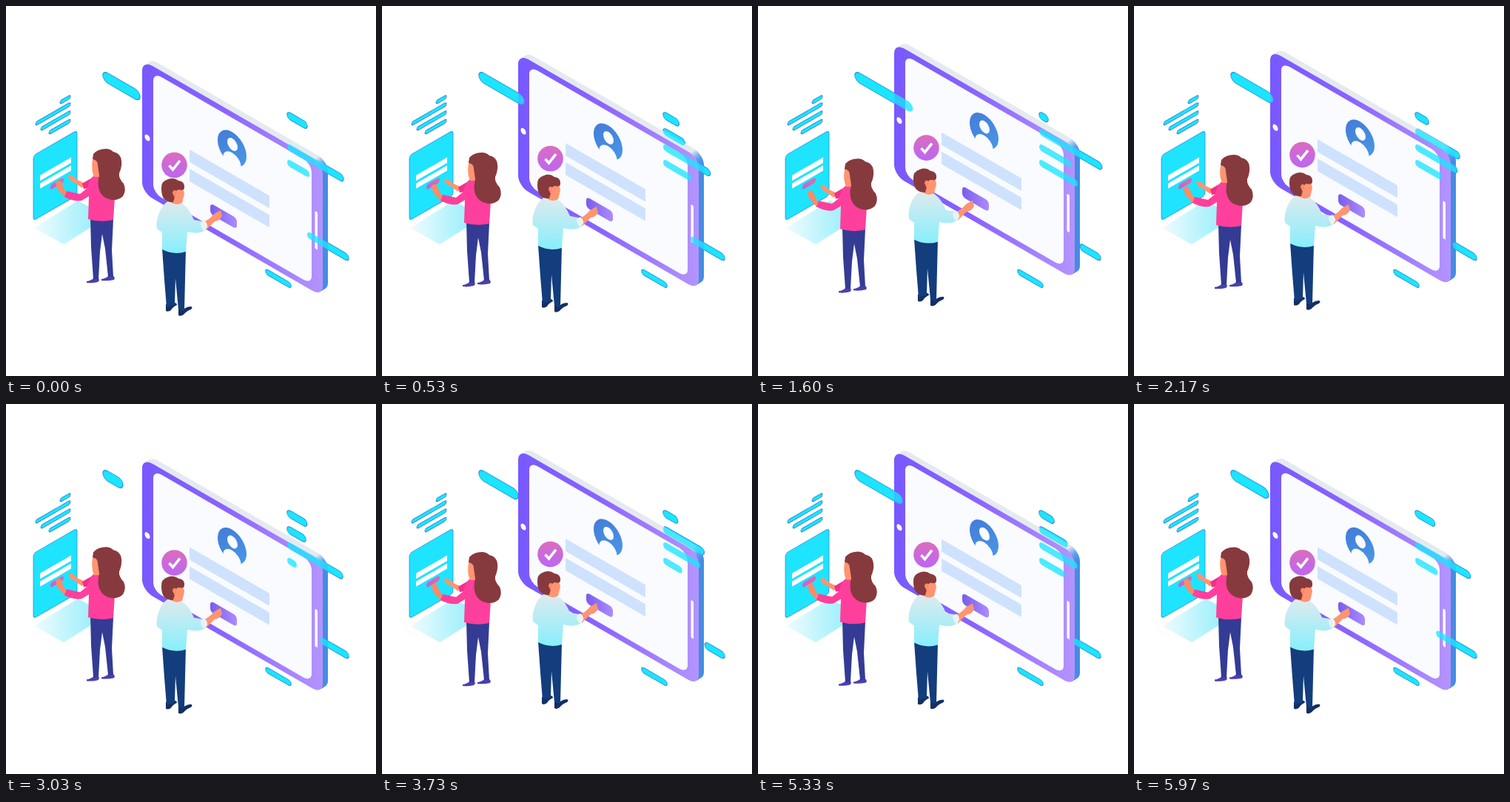
These frames come from a looping animation (500 px wide and 500 px high, 6.01 s). An HTML page:

```html
<!DOCTYPE html>
<html lang="en">
<head>
<meta charset="utf-8">
<title>Isometric sign-in</title>
<style>
  html, body { margin: 0; width: 100%; height: 100%; overflow: hidden; background: #fff; }
  svg { display: block; width: 100vw; height: 100vh; }
</style>
</head>
<body>
<svg viewBox="0 0 500 500">
  <defs>
    <linearGradient id="frame"><stop offset="0" stop-color="#7859ff"/><stop offset=".45" stop-color="#8a63ff"/><stop offset="1" stop-color="#b494ff"/></linearGradient>
    <linearGradient id="side"><stop offset=".95" stop-color="#e5eaf0"/><stop offset=".985" stop-color="#5b9bee"/><stop offset="1" stop-color="#4389e0"/></linearGradient>
    <linearGradient id="avatar" x2="1" y2="1"><stop offset="0" stop-color="#4279d6"/><stop offset="1" stop-color="#4a9ae8"/></linearGradient>
    <linearGradient id="badge" x2="0" y2="1"><stop offset="0" stop-color="#dc6cbe"/><stop offset="1" stop-color="#bb66f5"/></linearGradient>
    <linearGradient id="button"><stop offset="0" stop-color="#7b5cec"/><stop offset="1" stop-color="#ab8cff"/></linearGradient>
    <linearGradient id="pink"><stop offset="0" stop-color="#c065d8"/><stop offset="1" stop-color="#e06aaa"/></linearGradient>
    <linearGradient id="base"><stop offset="0" stop-color="#f0fcff"/><stop offset=".75" stop-color="#a2f0fb"/></linearGradient>
    <linearGradient id="shirt" x2="0" y2="1"><stop offset="0" stop-color="#e0eaee"/><stop offset="1" stop-color="#86effc"/></linearGradient>
    <rect id="slab" width="244" height="179" rx="14"/>
  </defs>

  <!-- laptop -->
  <path d="M38 300 97 263 137 285 78 322Z" fill="url(#base)"/>
  <g transform="translate(37 202) skewY(-30)">
    <rect width="59" height="88" rx="4" fill="#1ee4ff" stroke="#2a8ee0" stroke-width=".8"/>
    <path d="M9 32h42v7.500h-42zM9 43h42v7h-42z" fill="#fff"/>
    <rect x="23" y="53" width="18" height="7" rx="3" fill="url(#pink)"/>
  </g>
  <g id="stripes" fill="#1ce4ff" stroke="#2a7fd8" stroke-width=".9"></g>

  <g id="under" fill="#1ce5ff" stroke="#2a7fd8" stroke-width="1.400"></g>

  <g id="phone">
    <g transform="translate(184 73) skewY(30)">
      <g id="depth" fill="url(#side)"></g>
      <use href="#slab" fill="url(#frame)"/>
      <rect x="15" y="8" width="214" height="163" rx="11" fill="#f9fbff"/>
      <ellipse cx="7" cy="101" rx="3.500" ry="4" fill="#fff"/>
      <rect x="233.500" y="69" width="3.500" height="51" rx="1.700" fill="#fff"/>
      <ellipse cx="121.500" cy="49" rx="19.500" ry="22" fill="url(#avatar)"/>
      <g fill="#f9fbff">
        <ellipse cx="122" cy="43.500" rx="7" ry="8"/>
        <ellipse cx="121.500" cy="67" rx="12" ry="12"/>
      </g>
      <g fill="#cfe2fd">
        <rect x="64" y="84" width="108" height="17" rx="1"/>
        <rect x="64" y="110" width="108" height="17" rx="1"/>
      </g>
      <rect x="92" y="140" width="36" height="15" rx="5" fill="url(#button)"/>
    </g>
    <circle cx="227.500" cy="215" r="17.300" fill="url(#badge)"/>
    <path d="M220.500 215.500l5 5.500 9.500-12" fill="none" stroke="#fff" stroke-width="3.600"/>
  </g>

  <g id="over" fill="#1ce5ff" opacity=".78"></g>

  <g id="woman">
    <path d="M109 372q6-1 9-4h7q2 3-1 5-8 2-15 1zM129 369q6-1 9-4h7q3 2 1 5-9 2-17 1z" fill="#4b3fb0"/>
    <path d="M114 286 145 288 143 330 145 366 138 366 134 328 130 308 127 332 125 369 118 369 115 326Z" fill="#343b94"/>
    <path d="M106 239Q96 236 91 230 84 227 84 231 87 237 93 239L103 246Z" fill="#ff9470"/>
    <path d="M123 229Q114 233 103 240L105 247 114 246Z" fill="#f0308c"/>
    <path d="M83 253Q77 247 75 238 72 234 67 238L69 247 80 259Z" fill="#ff8a66"/>
    <path d="M119 229Q112 234 110 246L100 254 82 250 79 258Q92 265 102 263L112 257 111 288Q128 293 145 289L147 258 142 232Z" fill="#ff3f9c"/>
    <path d="M118 204Q115 214 117 225L119 231 130 231 130 206Z" fill="#ff9470"/>
    <path d="M118 200Q124 193 135 193 141 193 145 197 155 199 156 209 157 217 153 226 152 233 159 240 163 249 158 257 152 263 143 262 130 260 126 249 123 240 126 229L124 215Q124 208 117 207Z" fill="#873a3d"/>
  </g>

  <g id="man">
    <path d="M216 403l11-2q4 0 4 3-6 3-8 7-4 3-7 1zM233 409h8q4-3 9-3 3 1 0 4-6 2-10 7-4 3-7 1z" fill="#152e63"/>
    <path d="M211 328 243 330 242 370 241 412 233 410 229 368 228 404 217 407 214 370Z" fill="#133d7c"/>
    <path d="M265 293Q276 288 281 281L290 276 292 284Q288 291 282 291L270 303Z" fill="#ff9470"/>
    <path d="M220 263Q212 268 208 277 202 290 204 301L211 306 211 329Q227 337 243 332L245 305Q258 309 268 304L272 298 266 291 254 289Q248 274 238 267Z" fill="url(#shirt)"/>
    <path d="M263 293 268 290Q273 294 272 299L268 304Q263 300 263 293Z" fill="#e9f3f6"/>
    <path d="M221 254 221 264Q230 271 238 266L240 258 241 254 239 245 226 243Z" fill="#ff9470"/>
    <path d="M210 247Q209 237 219 234 227 231 233 236 242 237 241 246 240 250 233 248L230 250Q226 247 225 253L228 258 226 265Q218 266 213 260 210 255 210 247Z" fill="#873a3d"/>
    <path d="M226 250q4-2 4 3t-3 5z" fill="#ff8a66"/>
  </g>
</svg>
<script>
const LOOP = 6010;
const $ = id => document.getElementById(id);

function add(parent, tag, attrs) {
  const el = document.createElementNS('http://www.w3.org/2000/svg', tag);
  for (const key in attrs) el.setAttribute(key, attrs[key]);
  return parent.appendChild(el);
}

// Phone thickness, back to front
for (let k = 7; k > 0; k--) {
  add($('depth'), 'use', { href: '#slab', transform: `translate(${k} ${-k * 1.2})` });
}

// Lines above the laptop: x, y, width
for (const [x, y, width] of [[73, 128, 14], [40, 157, 47], [47, 164, 40], [58, 169, 29]]) {
  add($('stripes'), 'rect', { width, height: 5, rx: 2.5, transform: `translate(${x} ${y}) skewY(-30)` });
}

// Stretching bars: anchor x, y, height, width at each quarter of the loop
const bars = [
  { x: 131, y: 87, h: 13.5, w: [50, 82, 26, 82] },
  { x: 380, y: 142, h: 9.5, w: [27, 11, 27, 12] },
  { x: 380, y: 164, h: 9.5, w: [-3, 89, 24, 89] },
  { x: 380, y: 185, h: 9.5, w: [76, 41, 76, 22.5] },
  { x: 380, y: 206, h: 9.5, w: [30, 55, 12.5, 40] },
  { x: 463, y: 336.3, h: 9, w: [56, 27, 39, 13.5], fromRight: true },
  { x: 351, y: 355, h: 7, w: [34, 34, 34, 34] }
];
for (const bar of bars) {
  bar.rects = ['under', 'over'].map(id => add($(id), 'rect', {
    height: bar.h, rx: bar.h / 2, transform: `translate(${bar.x} ${bar.y}) skewY(30)`
  }));
}

// Linear path through values set at the quarters
function quarters(values, p) {
  const i = Math.floor(p * 4) % 4;
  return values[i] + (values[(i + 1) % 4] - values[i]) * (p * 4 - i);
}

function shift(id, dy) {
  $(id).setAttribute('transform', `translate(0 ${dy})`);
}

function draw(now) {
  const p = now % LOOP / LOOP;
  const lift = quarters([0, 1, 0, 1], p);
  shift('phone', -25 * lift);
  shift('man', -14.3 * lift);
  shift('woman', 14.3 * lift);
  for (const bar of bars) {
    const width = Math.max(0, quarters(bar.w, p));
    for (const rect of bar.rects) {
      rect.setAttribute('width', width);
      if (bar.fromRight) rect.setAttribute('x', -width);
    }
  }
}

let start;
function tick(now) {
  start ??= now;
  draw(now - start);
  requestAnimationFrame(tick);
}
draw(0);
requestAnimationFrame(tick);
</script>
</body>
</html>
```
